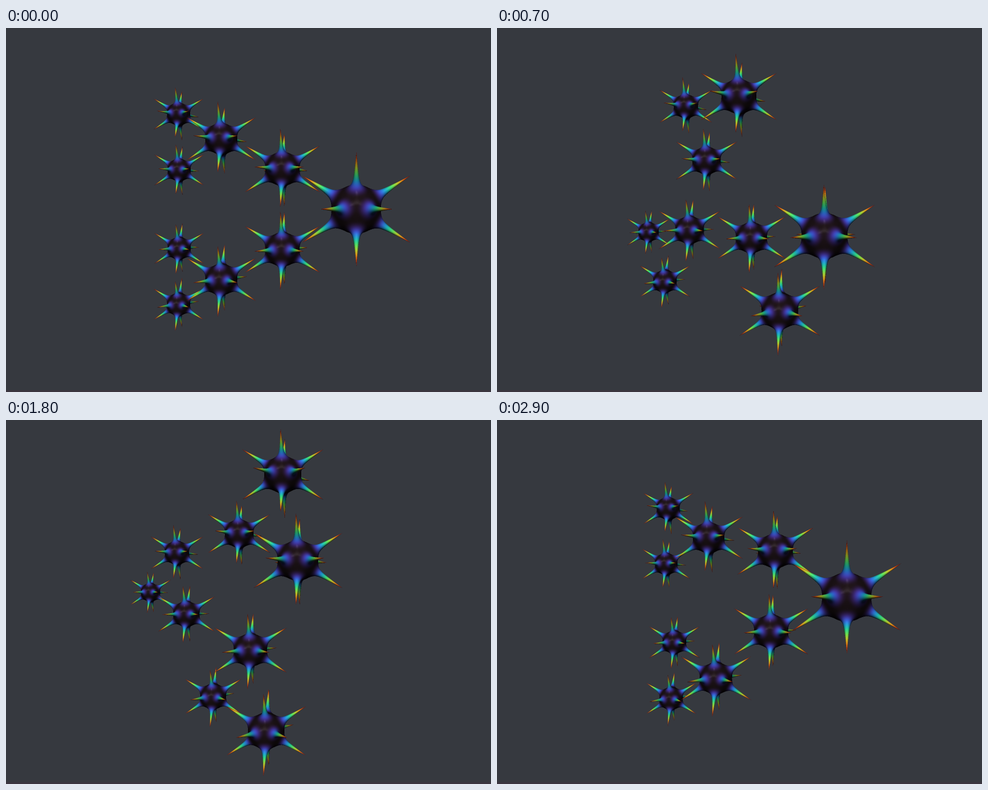
These frames come from a looping animation (864x648 px, 3000 ms). An HTML page with a canvas:

```html
<!DOCTYPE html>
<html lang="en">
<head>
<meta charset="utf-8">
<title>Spiky spheres</title>
<style>
  html, body { margin: 0; width: 100%; height: 100%; overflow: hidden; background: #36393f; }
  canvas { display: block; }
</style>
</head>
<body>
<canvas id="stage" width="864" height="648"></canvas>
<script>
const W = 864, H = 648, SS = 2, BW = W * SS, BH = H * SS;
const LOOP = 3000, STEP = 100;
const FOCAL = 1400, VX = 615, VY = 322.5;   // vanishing point of the view axis
const RINGS = 24, SECTORS = 32, CAP = 0.72;

const ctx = document.getElementById('stage').getContext('2d');
const buffer = document.createElement('canvas');
buffer.width = BW;
buffer.height = BH;
const bufferCtx = buffer.getContext('2d');
const image = bufferCtx.createImageData(BW, BH);
const pixels = new Uint32Array(image.data.buffer);
const depth = new Float32Array(BW * BH);

const dot = (a, b) => a[0] * b[0] + a[1] * b[1] + a[2] * b[2];
const cross = (a, b) => [a[1] * b[2] - a[2] * b[1], a[2] * b[0] - a[0] * b[2], a[0] * b[1] - a[1] * b[0]];
const unit = a => { const l = Math.hypot(...a); return a.map(c => c / l); };
const clamp = (x, lo = 0, hi = 1) => Math.min(hi, Math.max(lo, x));
const poly = (x, ...k) => k.reduceRight((sum, c) => sum * x + c, 0);
const cosDeg = a => Math.cos(a * Math.PI / 180);
const sinDeg = a => Math.sin(a * Math.PI / 180);

// Turbo colour map
const turbo = x => [
  poly(x, 0.1357, 4.6154, -42.6603, 132.1311, -152.9424, 59.2864),
  poly(x, 0.0914, 2.1942, 4.843, -14.185, 4.2773, 2.8296),
  poly(x, 0.1067, 12.6419, -60.582, 110.3628, -89.9031, 27.3482)
].map(c => clamp(c));

// Spikes point to the corners of an icosahedron
const PHI = (1 + Math.sqrt(5)) / 2, TIP = Math.hypot(1, PHI);
const spikes = [];
for (const s of [1, -1]) for (const t of [PHI, -PHI]) {
  spikes.push(unit([t, s, 0]), unit([0, t, s]), unit([s, 0, t]));
}

const LIGHT = unit([0, 0.45, 1]), GLINT = unit([0.03, 0.3, 1]);
const BASE = 0.385, RISE = 0.635;

function surface(dir) {
  let height = -0.04;
  const slope = [0, 0, 0];
  for (const v of spikes) {
    const c = clamp(dot(dir, v), -1, 1), angle = Math.acos(c), s = Math.sin(angle);
    const narrow = 0.7 * Math.exp(-angle / 0.045), wide = 0.3 * Math.exp(-angle / 0.2);
    height += narrow + wide;
    if (s > 1e-4) {
      const g = (narrow / 0.045 + wide / 0.2) * RISE / s;
      for (let i = 0; i < 3; i++) slope[i] += g * (v[i] - dir[i] * c);
    }
  }
  height = clamp(height);
  const r = BASE + RISE * height;
  const normal = unit(dir.map((d, i) => d * r - slope[i]));
  const shade = 0.12 + 0.8 * Math.max(0, dot(normal, LIGHT));
  const glint = 0.1 * Math.max(0, dot(normal, GLINT)) ** 300;
  return {
    pos: dir.map(d => d * r * TIP),
    rgb: turbo(height).map(c => 255 * clamp(c * shade + glint))
  };
}

// One polar cap per spike; neighbouring caps overlap on the same surface
const verts = [], tris = [];
for (const v of spikes) {
  const a = unit(cross(v, [0.3, 0.5, 0.8])), b = cross(v, a), first = verts.length;
  for (let i = 0; i <= RINGS; i++) {
    const angle = CAP * (i / RINGS) ** 2, s = Math.sin(angle), c = Math.cos(angle);
    for (let j = 0; j < SECTORS; j++) {
      const turn = j / SECTORS * 2 * Math.PI, p = Math.cos(turn), q = Math.sin(turn);
      verts.push(surface(unit(v.map((k, n) => k * c + s * (a[n] * p + b[n] * q)))));
      if (i === RINGS) continue;
      const k = first + i * SECTORS, next = (j + 1) % SECTORS;
      tris.push(k + j, k + SECTORS + j, k + SECTORS + next);
      if (i) tris.push(k + j, k + SECTORS + next, k + next);
    }
  }
}
const sx = new Float32Array(verts.length), sy = sx.slice(), sz = sx.slice();

function fillTriangle(a, b, c) {
  const ax = sx[a], ay = sy[a], bx = sx[b], by = sy[b], cx = sx[c], cy = sy[c];
  const area = (bx - ax) * (cy - ay) - (by - ay) * (cx - ax);
  if (area >= 0) return;
  const x0 = Math.max(0, Math.ceil(Math.min(ax, bx, cx))), x1 = Math.min(BW - 1, Math.max(ax, bx, cx));
  const y0 = Math.max(0, Math.ceil(Math.min(ay, by, cy))), y1 = Math.min(BH - 1, Math.max(ay, by, cy));
  const A = verts[a].rgb, B = verts[b].rgb, C = verts[c].rgb;
  for (let y = y0; y <= y1; y++) {
    for (let x = x0; x <= x1; x++) {
      const u = ((bx - x) * (cy - y) - (by - y) * (cx - x)) / area;
      const v = ((cx - x) * (ay - y) - (cy - y) * (ax - x)) / area;
      const w = 1 - u - v;
      if (u < 0 || v < 0 || w < 0) continue;
      const z = u * sz[a] + v * sz[b] + w * sz[c], at = y * BW + x;
      if (z <= depth[at]) continue;
      depth[at] = z;
      const mix = i => u * A[i] + v * B[i] + w * C[i];
      pixels[at] = 0xff000000 | mix(2) << 16 | mix(1) << 8 | mix(0);
    }
  }
}

function drawBall({ x, y, far }) {
  const size = 60 / far;
  verts.forEach(({ pos }, i) => {
    const p = 1 / (1 - pos[2] * size / FOCAL);
    sx[i] = SS * (VX + (x - VX + pos[0] * size) * p) - 0.5;
    sy[i] = SS * (VY + (y - VY - pos[1] * size) * p) - 0.5;
    sz[i] = pos[2] * size - far * 1000;
  });
  for (let i = 0; i < tris.length; i += 3) fillTriangle(tris[i], tris[i + 1], tris[i + 2]);
}

// Three closed orbits; angles in degrees
const middleOrbit = a => {
  const c = cosDeg(a);
  return {
    x: (379 + 39.6 * c) / (1 - 0.329 * c),
    y: VY + 87 * sinDeg(a) / (1 - 0.16 * c),
    far: 1.8 - 0.85 * c + 0.0525 * cosDeg(2 * a)
  };
};
const tiltedOrbit = a => ({
  x: 394.5 + 102.1 * cosDeg(a + 27.7) + 8.4 * cosDeg(2 * a + 25),
  y: 313.1 + 206.2 * cosDeg(a - 108.1) + 26 * cosDeg(2 * a - 86.5) + 2.3 * cosDeg(3 * a - 85),
  far: 1.732 + 0.424 * cosDeg(a - 131.7) + 0.034 * cosDeg(2 * a + 100)
});
const mirroredOrbit = a => {
  const ball = tiltedOrbit(-a);
  return { ...ball, y: 2 * VY - ball.y };
};

function draw(time) {
  pixels.fill(0);
  depth.fill(-1e9);
  for (const orbit of [middleOrbit, tiltedOrbit, mirroredOrbit]) {
    for (let k = 0; k < 3; k++) drawBall(orbit(120 * (k + time / LOOP)));
  }
  bufferCtx.putImageData(image, 0, 0);
  ctx.fillStyle = '#36393f';
  ctx.fillRect(0, 0, W, H);
  ctx.fillStyle = '#3b353f';
  ctx.fillRect(0, H - 3, W, 3);
  ctx.drawImage(buffer, 0, 0, W, H);
}

let shown = -1;
function tick() {
  const time = Math.floor(performance.now() % LOOP / STEP) * STEP;
  if (time !== shown) draw(shown = time);
  requestAnimationFrame(tick);
}
tick();
</script>
</body>
</html>
```
